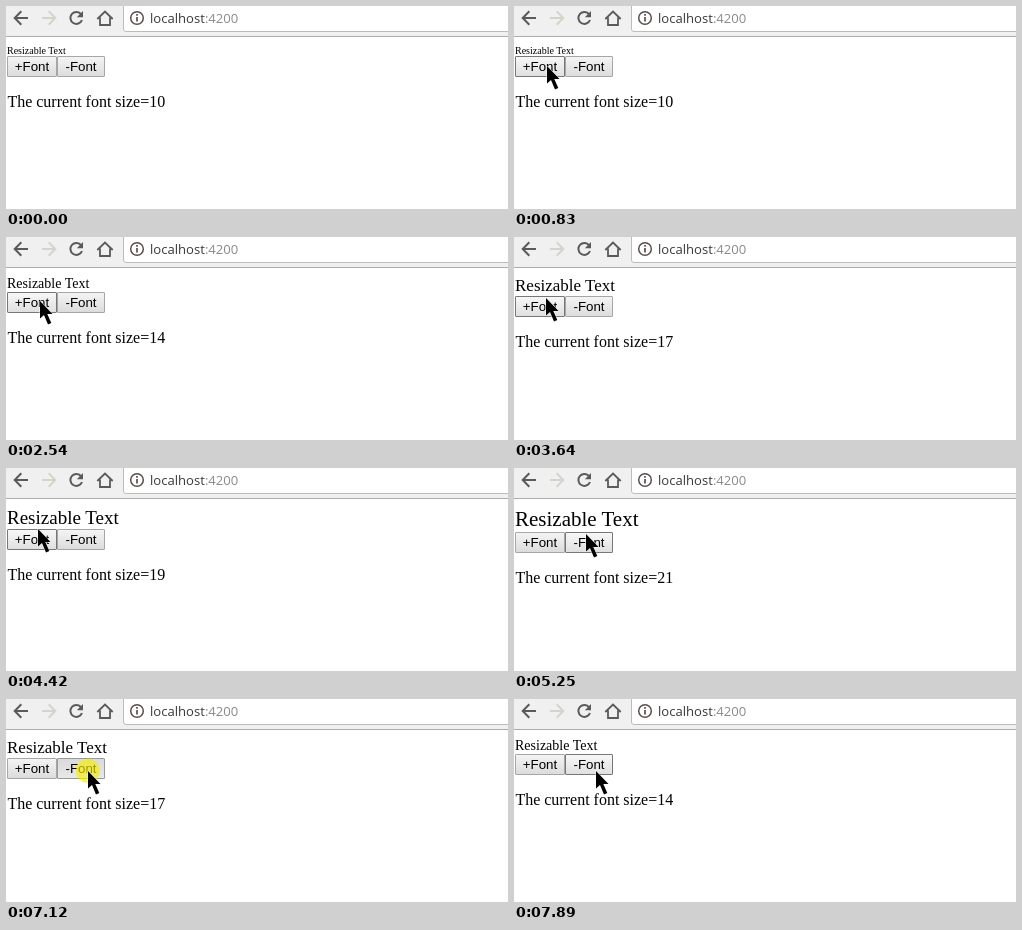
An HTML page that plays this animation: 502x203 px, repeating every 8000 ms.

```html
<!DOCTYPE html>
<html lang="en">
<head>
<meta charset="utf-8">
<title>Resizable Text</title>
<style>
  html, body { margin: 0; width: 100%; height: 100%; overflow: hidden; background: #fff; }
  #stage { position: relative; width: 502px; height: 203px; overflow: hidden; background: #fff;
    font: 16px/18px "Liberation Serif", "Times New Roman", serif; color: #000; }
  #stage > * { position: absolute; white-space: nowrap; }
  #bar { left: 0; top: 0; width: 502px; height: 30px; background: #f0f0f0; border-bottom: 1px solid #acacac; }
  #box { position: absolute; left: 117px; top: -6px; width: 400px; height: 30px; background: #fff;
    border: 1px solid #bcbcbc; border-radius: 3px; }
  #url { position: absolute; left: 144px; top: 3px; font: 13.1px/19px "Open Sans", "Noto Sans", sans-serif; color: #3a3a3a; }
  #url span { color: #8a8a8a; }
  svg { position: absolute; left: 0; top: 0; }
  #title { left: 1px; top: 39px; }
  .btn { box-sizing: border-box; height: 21px; border: 1px solid #a6a6a6; border-radius: 1px; text-align: center;
    font: 13.333px/19px "Liberation Sans", Arial, sans-serif; background: linear-gradient(#f4f4f4, #dcdcdc); }
  .btn.hover { border-color: #777; background: linear-gradient(#f7f7f7, #e0e0e0); }
  .btn.down { border-color: #999; background: linear-gradient(#dadada, #e8e8e8); }
  #plus { left: 1px; width: 50px; }
  #minus { left: 51px; width: 48px; }
  #info { left: 1.4px; }
  #halo { left: -12px; top: -12px; width: 24px; height: 24px; border-radius: 50%; background: rgba(246, 240, 0, .65); }
  #cursor { overflow: visible; }
</style>
</head>
<body>
<div id="stage">
  <div id="bar">
    <div id="box"></div>
    <svg width="140" height="30" fill="none" stroke="#5a5a5a" stroke-width="2">
      <path d="M22 12H9M15.3 5.3L8.7 12l6.6 6.7"/>
      <path d="M36 12h13M42.7 5.3L49.3 12l-6.6 6.7" stroke="#d6d4ca"/>
      <path d="M75.2 8.3A6 6 0 1 0 76 14"/>
      <path d="M77 5v6.2h-6.2z" fill="#5a5a5a" stroke="none"/>
      <path d="M91.3 13L99 5.5l7.7 7.5M94 11.5V19h10v-7.5" stroke-width="1.8"/>
      <g stroke="#5c4c4c" stroke-width="1.5">
        <circle cx="131" cy="12" r="6.3"/>
        <path d="M131 11v4.6M131 8v1.7" stroke-width="1.7"/>
      </g>
    </svg>
    <div id="url">localhost<span>:4200</span></div>
  </div>
  <div id="title">Resizable Text</div>
  <div id="plus" class="btn">+Font</div>
  <div id="minus" class="btn">-Font</div>
  <div id="info"></div>
  <div id="halo"></div>
  <svg id="cursor" width="14" height="25">
    <path d="M0 0V17.5L4 14L8 23.5L11.3 22L7.3 13H12.5Z" fill="#000" stroke="#fff" stroke-width=".8" paint-order="stroke"/>
  </svg>
</div>
<script>
const LOOP = 8000, ENTER = 130, HOLD = 90, MS_PER_PX = 9, PAGE_TOP = 39;
const $ = id => document.getElementById(id);

// time and font size; the clicks between two entries are evenly spaced
const sizes = [[0, 10], [1080, 11], [1460, 12], [2540, 14], [3640, 17], [4420, 19],
  [4900, 21], [5880, 20], [6100, 19], [6490, 18], [7890, 14]];

// arrival time and place of the pointer
const stops = [[ENTER, 62, 1], [800, 33, 60], [2390, 34, 64], [3490, 32, 61], [5250, 72, 66], [5750, 82, 72]];

function sizeAt(t) {
  const i = sizes.findLastIndex(([time]) => time <= t);
  const [t0, s0] = sizes[i], [t1, s1] = sizes[i + 1] || [LOOP, s0];
  return s0 + Math.trunc((s1 - s0) * (t - t0) / (t1 - t0));
}

function pointerAt(t) {
  let [, x, y] = stops[0];
  for (const [end, tx, ty] of stops.slice(1)) {
    const dx = tx - x, dy = ty - y;
    const left = (end - t) / (MS_PER_PX * Math.hypot(dx, dy));
    if (left >= 1) break;
    const k = 1 - Math.max(0, left) ** 2;
    x += dx * k;
    y += dy * k;
  }
  return [Math.round(x), Math.round(y)];
}

// ascent + descent + line gap, each rounded to whole pixels
const lineHeight = s => [.891, .216, .042].reduce((h, m) => h + Math.round(m * s), 0);

function draw(t) {
  const size = sizeAt(t);
  const pressed = sizeAt(Math.min(t + HOLD, LOOP - 1)) !== size;
  const [x, y] = pointerAt(t);
  const lh = lineHeight(size), top = PAGE_TOP + lh;

  $("title").style.fontSize = size + "px";
  $("title").style.lineHeight = lh + "px";
  $("info").style.top = top + 37 + "px";
  $("info").textContent = "The current font size=" + size;

  for (const id of ["plus", "minus"]) {
    const el = $(id);
    const over = x >= el.offsetLeft && x < el.offsetLeft + el.offsetWidth && y >= top && y < top + 21;
    el.style.top = top + "px";
    el.className = "btn" + (over ? pressed ? " down" : " hover" : "");
  }

  for (const id of ["cursor", "halo"]) $(id).style.transform = `translate(${x}px, ${y}px)`;
  $("cursor").style.visibility = t < ENTER ? "hidden" : "visible";
  $("halo").style.visibility = pressed ? "visible" : "hidden";
}

function tick() {
  draw(performance.now() % LOOP);
  requestAnimationFrame(tick);
}
tick();
</script>
</body>
</html>
```
